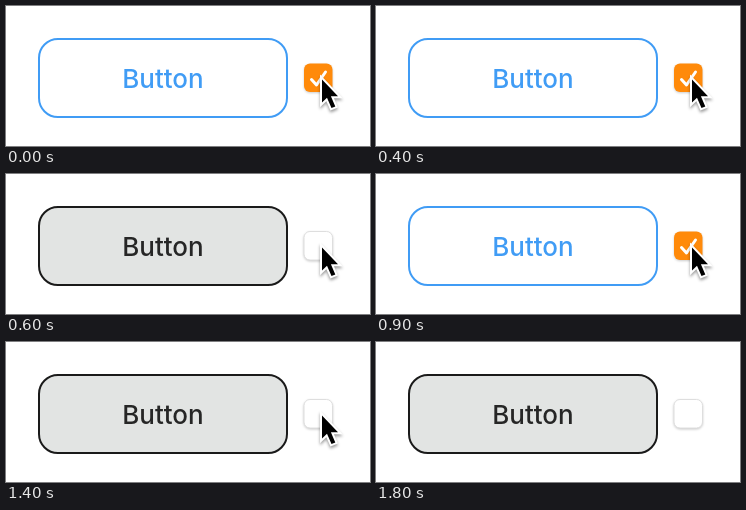
Recreate the animation shown at these times as an HTML page. Size 364 by 140 pixels, loop 2 s.

```html
<!DOCTYPE html>
<html lang="en">
<head>
<meta charset="utf-8">
<title>Button toggle</title>
<style>
  html, body { margin: 0; width: 100%; height: 100%; overflow: hidden; background: #fff; }
  svg { display: block; width: 364px; height: 140px; }
  #button { fill: #fff; stroke: #409cf5; stroke-width: 2; }
  #label { fill: #409cf5; font: 450 26px Inter, sans-serif; text-anchor: middle; }
  #box { fill: #ff8a0a; }
  .off #button { fill: #e2e4e3; stroke: #1a1a1a; }
  .off #label { fill: #262626; }
  .off #box { fill: #fff; stroke: #dedede; }
  .off #check { display: none; }
  #check { fill: none; stroke: #fff; stroke-width: 3; stroke-linecap: round; stroke-linejoin: round; }
  #shade { filter: drop-shadow(0 1px 1px #0003); }
  #cursor { stroke: #fff; stroke-width: 4; paint-order: stroke; filter: drop-shadow(0 2px 1.5px #0006); }
</style>
</head>
<body>
<svg id="stage" viewBox="0 0 364 140">
  <rect id="button" x="33" y="33" width="248" height="78" rx="19"/>
  <text id="label" x="157" y="82">Button</text>
  <g id="shade"><rect id="box" x="298" y="57.5" width="28.5" height="28.5" rx="6"/></g>
  <path id="check" d="M305.5 73.5l5 5.5 9-13"/>
  <path id="cursor" d="M316 73.500V96.500l5-4.800 4.500 10.300 3.800-1.600-4.400-10.200H332z"/>
</svg>
<script>
  const stage = document.getElementById("stage");
  const cursor = document.getElementById("cursor");
  const LOOP = 2000, STEP = 100;
  const start = performance.now();

  function draw(now) {
    const t = Math.max(0, now - start) % LOOP;
    const off = (t >= 500 && t < 900) || t >= 1400;
    stage.setAttribute("class", off ? "off" : "");

    // The pointer accelerates out to the right, in 100 ms steps.
    const n = Math.max(0, Math.floor(t / STEP) - 15);
    cursor.setAttribute("transform", `translate(${5 * n * n})`);
    cursor.style.display = t < 1800 ? "" : "none";
    requestAnimationFrame(draw);
  }
  draw(start);
</script>
</body>
</html>
```
